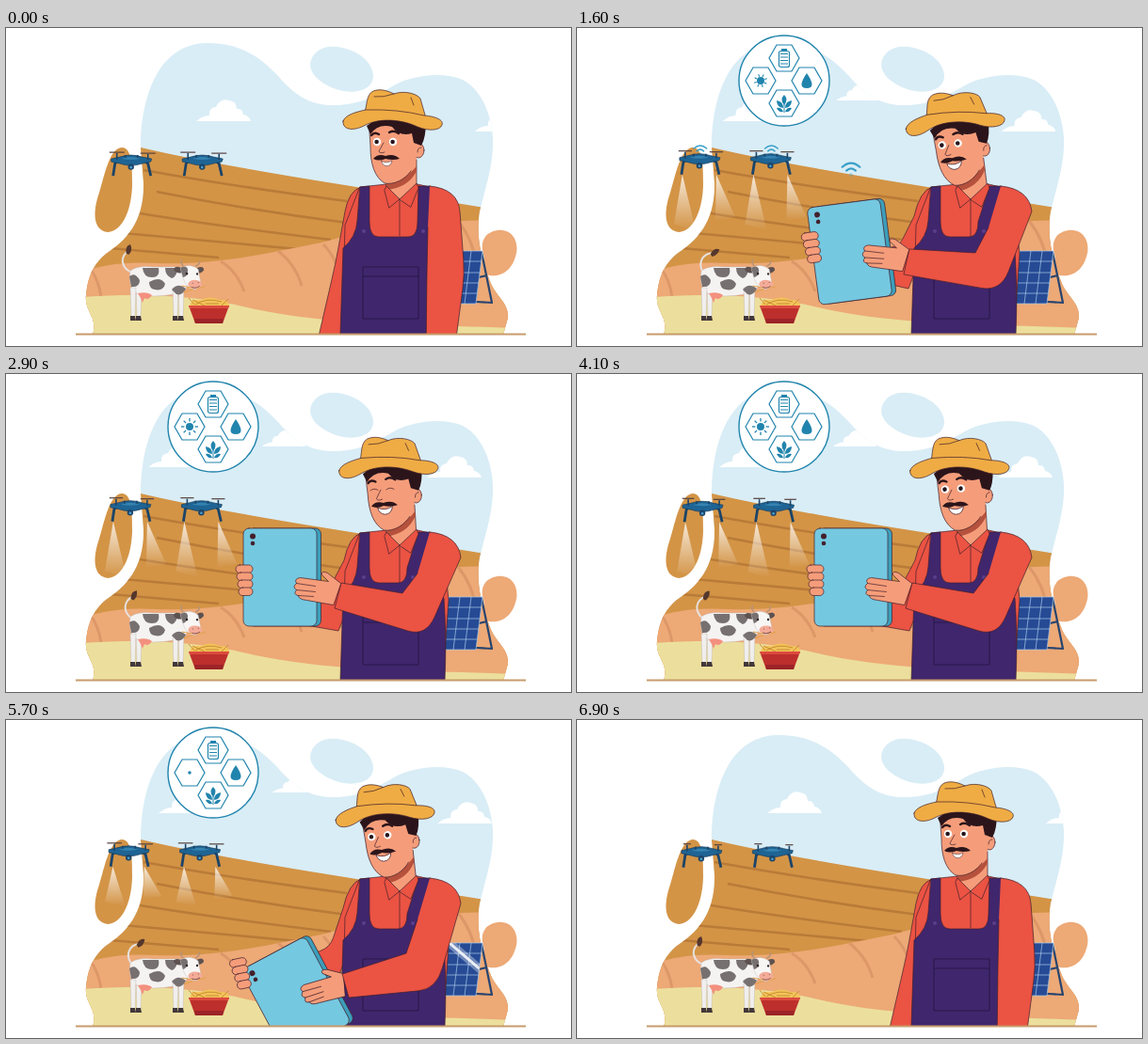
Animation, 600 px wide and 338 px high, one loop 7000 ms. Source, as an HTML page:

```html
<!DOCTYPE html>
<html lang="en">
<head>
<meta charset="utf-8">
<title>Smart farming</title>
<style>
html,body{margin:0;width:100%;height:100%;overflow:hidden;background:#fff}
svg{display:block;width:100vw;height:100vh}
.ink{stroke:#43202c;stroke-width:.7;stroke-linejoin:round;stroke-linecap:round}
.no{fill:none}
</style>
</head>
<body>
<svg id="stage" viewBox="0 0 600 338"></svg>
<script>
const LOOP = 7000, TURN = 6900;
const BLUE = '#2184ad', SKIN = '#f59d7a', SHIRT = '#eb5343', PURPLE = '#40266d', HAT = '#efac44';
const stage = document.getElementById('stage');

const cloud = id => `<path id="${id}" fill="#fff" d="M-29 0Q-22-6-15-6Q-16-14-8-15Q-3-25 6-22Q14-21 14-13Q20-14 21-7Q27-6 29 0Z"/>`;
const wifi = id => `<g id="${id}" fill="none" stroke="#3aa0c8" stroke-width="2" stroke-linecap="round">
  <circle r="1.8" fill="#3aa0c8" stroke="none"/><path d="M-4.5-4Q0-8 4.5-4"/><path d="M-8.5-7.5Q0-15 8.5-7.5"/></g>`;
const drone = id => `<g id="${id}">
  <g class="beam" fill="url(#ray)"><path d="M-18 13L-27 66L-4 72Z"/><path d="M18 13L17 62L38 58Z"/></g>
  <path d="M-14-3L-17 0L-19 13M14-3L18 0L21 13" class="no" stroke="#1c4468" stroke-width="2.8"/>
  <path d="M-21-5L-12-7Q0-11 12-7L22-5L21-2L12 0Q0 4-12 0L-21-2Z" fill="#1e6494" stroke="#173d5c" stroke-width=".7"/>
  <path d="M-10-5Q0-9 10-5Q0-3-10-5" fill="#3583b0"/>
  <path d="M-15-4V-11M18-4V-10M-6-6V-9M7-6V-9" stroke="#1c4468" stroke-width="1.6"/>
  <g class="prop" stroke="#54403f" stroke-width="1.2"><path d="M-8 0H8"/><path d="M-8 0H8"/></g>
  <circle cy="3.5" r="3.2" fill="#1c4468"/><circle cy="4" r="1.3" fill="#4ba1cd"/>
</g>`;
const hex = (x, y, id, icon) => `<g transform="translate(${x} ${y})">
  <path class="no" stroke="${BLUE}" stroke-width="1.2" d="M-16 0L-8-14H8L16 0L8 14H-8Z"/><g id="${id}" fill="${BLUE}">${icon}</g></g>`;
const spin = (n, draw) => Array.from({length: n}, (_, i) => `<g transform="rotate(${i * 360 / n})">${draw}</g>`).join('');

const battery = `<path d="M-3-10H3V-8H-3Z"/><rect class="no" x="-5.5" y="-7.5" width="11" height="17" rx="2" stroke="${BLUE}" stroke-width="1.2"/>
  <path d="M-4-4.5H4M-4-1H4M-4 2.5H4M-4 6H4" stroke="${BLUE}" stroke-width="1.1"/>`;
const drop = '<path d="M0-8Q11 8 0 8Q-11 8 0-8Z"/>';
const sun = '<circle id="core" r="4"/><g id="rays">' + spin(8, `<path d="M0-5.6V-9" stroke="${BLUE}" stroke-width="1.3"/>`) + '</g>';
const leaf = `<path d="M0-9Q5-4 0 2Q-5-4 0-9ZM1 5Q1-2 8-3Q8 4 1 5ZM-1 5Q-1-2-8-3Q-8 4-1 5ZM1 9Q3 4 8 5Q6 10 1 9ZM-1 9Q-3 4-8 5Q-6 10-1 9Z"/>
  <path d="M0 0V10" stroke="${BLUE}"/>`;

const BLOB = `M143 127C143 80 158 18 212 16C250 15 272 33 288 50C301 65 317 81 344 82
  C374 83 393 72 412 61C432 50 464 46 485 55C506 66 516 94 517 118C518 145 509 170 503 195
  C498 224 507 251 514 269C520 286 534 291 533 308L528 326H92C98 307 83 302 85 284
  C87 262 94 250 106 240C128 226 147 205 146 165Z`;

const scenery = `
<path d="${BLOB}" fill="#d9edf6"/>
<path d="M324 34C329 20 345 17 361 22C379 27 391 40 390 53C388 67 369 70 354 66C336 61 319 48 324 34Z" fill="#d9edf6"/>
<g clip-path="url(#land)">
  ${cloud('c1')}${cloud('c2')}${cloud('c3')}
  <path d="M70 119L143 127Q210 143 360 167L540 196V330H70Z" fill="#d39446"/>
  <path class="no" stroke="#b97b38" stroke-width="2.6" d="M146 151Q245 169 362 184M160 174Q260 194 362 207M142 197Q228 211 345 225M124 218L310 235M110 234L226 244"/>
  <path d="M80 260Q112 247 160 250C225 252 280 239 335 228Q420 203 540 204V330H80Z" fill="#eda976"/>
  <path class="no" stroke="#dd9768" stroke-width="3" d="M89 255Q99 269 101 286M289 237Q308 252 314 274M337 230Q352 245 356 270M228 248Q245 258 253 280M480 205Q496 225 499 250"/>
  <path d="M80 286C155 281 212 286 265 299C350 317 450 315 540 319V330H80Z" fill="#ecdf9d"/>
</g>
<path d="M123 127C134 127 134 148 134 165C134 190 125 216 108 217C92 215 92 195 99 175C105 155 110 128 123 127Z" fill="#d39446"/>
<path d="M522 215C538 213 546 228 541 243C537 258 525 265 513 263C503 260 510 250 507 240C503 228 508 217 522 215Z" fill="#eda976"/>`;

const panel = `
<path d="M505 238L516 292M502 265L511 263M499 291L517 292" class="no" stroke="#27446f" stroke-width="2.2"/>
<path d="M470 237H506L499 293H462Z" fill="#264a94"/>
<path class="no" stroke="#a9cbe8" stroke-width=".7" d="M470 237H506L499 293H462ZM482 237L475 293M494 237L487 293M469 248H505M467 260H503M465 271H502M464 282H500"/>
<g clip-path="url(#cells)"><g id="glint"><path d="M-35-30L35 30" stroke="#fff" stroke-width="9" opacity=".35"/>
<path d="M-35-30L35 30" stroke="#fff" stroke-width="3" opacity=".85"/></g></g>`;

const leg = (x, y) => `<path d="M${x} ${y}H${x + 6}L${x + 5} 307H${x + 1}Z" fill="#f1efee" stroke="#b9b2b0" stroke-width=".4"/><path d="M${x} 306H${x + 5}L${x + 6} 311H${x}Z" fill="#42383a"/>`;
const cow = `
<g id="tail"><path class="no" d="M134 260C122 256 120 244 129 237" stroke="#e6e1df" stroke-width="2"/><path d="M127 240Q125 232 131 230Q134 236 130 241Z" fill="#55372c"/></g>
${leg(138, 275)}${leg(183, 275)}
<path d="M132 258Q140 252 156 254L184 254Q194 258 194 270Q192 282 178 283Q155 287 141 283Q129 278 132 258Z" fill="#f5f3f2" stroke="#b9b2b0" stroke-width=".4"/>
${leg(132, 276)}${leg(177, 276)}
<path d="M140 282Q150 280 155 284Q151 290 147 287L145 292L143 287Z" fill="#f3907f"/>
<path d="M131 264Q137 259 142 268Q142 276 133 275ZM145 255H162Q164 265 155 265Q146 265 145 255ZM152 270Q164 263 169 272Q167 280 158 278Q152 277 152 270ZM169 255H182Q182 264 176 266Q169 263 169 255ZM176 278Q183 270 191 277Q187 285 181 283Z" fill="#777070"/>
<g id="cowHead">
  <path d="M186 255Q179 252 178 257Q181 262 188 260ZM202 255Q210 251 210 257Q207 261 203 260Z" fill="#5d5250"/>
  <path d="M188 253Q184 249 187 246M201 253Q206 251 205 247" class="no" stroke="#b99376" stroke-width="1.6"/>
  <path d="M185 255Q195 249 204 256L207 270Q205 279 197 277Q189 274 185 255Z" fill="#f8f6f5" stroke="#b9b2b0" stroke-width=".4"/>
  <path d="M185 255Q192 251 193 257Q193 264 188 265Z" fill="#777070"/>
  <ellipse cx="201" cy="272" rx="7.5" ry="4.6" fill="#f3ab98"/>
  <path d="M198 271H199M204 270H205M197 275Q202 277 206 274" class="no" stroke="#8d5751"/>
  <circle cx="192" cy="261" r="1.3" fill="#2f2527"/><circle cx="203" cy="261" r="1.2" fill="#2f2527"/>
  <path d="M198 276L187 274M199 277L189 281M204 276L212 274" stroke="#e3a14e"/>
</g>
<path d="M195 296Q196 287 207 289Q217 284 227 289Q238 288 237 297Z" fill="#f2c45a"/>
<path class="no" stroke="#c98e32" d="M198 289L211 295M201 294Q213 286 229 291M194 287L200 294M229 295L236 288M212 293H226"/>
<path d="M194 295H237L230 314H201Z" fill="#bd2f2c"/><path d="M194 295H237L236 298H195Z" fill="#dc4a3e"/><path d="M200 309H231L230 314H201Z" fill="#9c2428"/>`;

const eye = (x, y) => `<circle cx="${x}" cy="${y}" r="4.2" fill="#fff"/><circle cx="${x - .4}" cy="${y}" r="2.3" fill="#26151b"/>`;
const head = `
<g id="head">
  <path d="M404 150L436 130V170L419 184L404 172Z" fill="${SKIN}"/>
  <path class="ink no" d="M436 140V168M404 164V173"/>
  <path d="M404 165Q422 163 436 147V152Q427 170 404 172Z" fill="#b5513c"/>
  <ellipse class="ink" cx="438" cy="130" rx="6" ry="8" fill="${SKIN}"/><path class="ink no" d="M437 132Q437 127 441 127"/>
  <path d="M386 100L387 126C387 144 391 158 402 165C418 168 434 153 436 136V100Z" fill="${SKIN}"/>
  <path class="ink no" d="M386 110L387 126C387 144 391 158 402 165C412 167 424 161 430 152"/>
  <path d="M383 104Q395 94 412 96L446 98Q446 117 441 125L433 122L431 112Q418 116 410 105Q395 101 387 113Z" fill="#2b151b"/>
  <g id="open">${eye(394, 121)}${eye(411, 121)}</g>
  <path id="shut" class="ink no" d="M390 122Q394 119 398 122M407 122Q411 119 415 122"/>
  <path class="no" d="M388 114Q391 110 396 113M407 111Q412 108 417 112" stroke="#2b151b" stroke-width="2.4" stroke-linecap="round"/>
  <path class="ink no" d="M401 122Q397 129 396 131Q397 134 402 132"/>
  <g id="mouth"><path class="ink" d="M-7-2Q1 2 8-3Q7 5 0 5Q-6 4-7-2Z" fill="#fff"/></g>
  <path d="M390 139Q395 133 403 136Q412 133 418 139Q411 141 403 139Q396 142 390 139Z" fill="#2b151b"/>
  <path class="ink" d="M380 93C384 82 382 71 390 67C398 64 406 67 412 70C423 66 437 70 440 75L446 96Q415 88 380 93Z" fill="${HAT}"/>
  <path class="ink" d="M358 99C360 92 373 89 382 87Q416 86 444 93C457 94 465 98 463 103C461 109 449 110 437 105C420 97 396 95 380 104C368 110 357 108 358 99Z" fill="${HAT}"/>
  <path class="ink no" d="M391 73Q401 74 412 70M430 74L433 82"/>
</g>`;

const torso = `
<path class="ink" d="M376 169L404 166L419 182L437 166L463 172L470 240L464 326H357L360 210Z" fill="${SHIRT}"/>
<path id="bib" class="ink" fill="${PURPLE}"/>
<path class="no" d="M379 254H438V309H379ZM379 264H438" stroke="#23153f" stroke-width=".8"/>
<circle cx="380" cy="216" r="2" fill="#5a3f8b"/><circle id="button" cy="216" r="2" fill="#5a3f8b"/>`;
const collar = `<path class="ink" d="M402 172L404 168L418 182L407 191ZM418 182L436 165L438 170L430 190Z" fill="${SHIRT}"/><path class="ink no" d="M418 182V221"/>`;

const tablet = `<g id="tablet"><rect class="ink" x="-33" y="-52" width="77" height="104" rx="6" fill="#3c9fbc"/>
  <rect class="ink" x="-38.5" y="-52" width="78" height="104" rx="6" fill="#74c8e0"/>
  <circle cx="-28.5" cy="-43.5" r="3" fill="#43202c"/><circle cx="-28.5" cy="-36" r="2.3" fill="#43202c"/></g>`;
const finger = (y, i) => `<rect class="ink" x="${i - 10}" y="${y}" width="${18 - i}" height="8.5" rx="4.2" fill="${SKIN}"/>`;
const hands = {
  grip: `<g id="grip">${[-17, -9, -1, 7].map(finger).join('')}</g>`,
  reach: `<path id="reach" class="ink" d="M2-7C-10-6-20-6-32 2L-42 14Q-40 20-34 16L-36 19Q-30 24-20 20L6 12Z" fill="${SKIN}"/>`,
  right: `<path id="rightHand" class="ink" d="M3-13L-11-24Q-18-27-17-22L-10-15L-40-19Q-47-18-44-13Q-49-9-44-6Q-48-1-42 0Q-42 4-33 5L-5 10ZM-44-13L-24-10M-44-6L-24-4M-42 0L-26 1" fill="${SKIN}"/>`
};

stage.innerHTML = `
<defs>
  <clipPath id="land"><path d="${BLOB}"/></clipPath>
  <clipPath id="cells"><path d="M470 237H506L499 293H462Z"/></clipPath>
  <clipPath id="above"><path d="M0 0H600V325H0Z"/></clipPath>
  <linearGradient id="ray" x1="0" y1="0" x2="0" y2="1"><stop stop-color="#fff" stop-opacity=".8"/><stop offset="1" stop-color="#fff" stop-opacity="0"/></linearGradient>
</defs>
<rect width="600" height="338" fill="#fff"/>
${scenery}
<g id="badge"><circle r="48" fill="#fff" stroke="${BLUE}" stroke-width="1.4"/>
  ${hex(0, -24, 'battery', battery)}${hex(-25, 0, 'sun', sun)}${hex(24, 0, 'drop', drop)}${hex(0, 24, 'leaf', leaf)}</g>
${panel}${cow}
${wifi('w1')}${wifi('w2')}${wifi('w3')}
${drone('d1')}${drone('d2')}
<g clip-path="url(#above)">
  <path id="leftArm" class="ink" fill="${SHIRT}"/>
  ${torso}${head}${collar}${hands.reach}${tablet}${hands.grip}${hands.right}
  <path id="rightArm" class="ink" fill="${SHIRT}"/>
</g>
<path d="M74 325.5H552" stroke="#c79b6c" stroke-width="1.8"/>`;

const el = {};
stage.querySelectorAll('[id]').forEach(n => el[n.id] = n);
const put = (n, x, y, r = 0, sx = 1, sy = sx) =>
  n.setAttribute('transform', `translate(${x} ${y}) rotate(${r}) scale(${sx} ${sy})`);
const turn = (n, r, x, y) => n.setAttribute('transform', `rotate(${r} ${x} ${y})`);
const show = (n, v) => n.setAttribute('opacity', v);
const ramp = (v, a, b) => Math.min(1, Math.max(0, (v - a) / (b - a)));
const out = k => 1 - (1 - k) ** 3;

// Poses: hanging, reaching down, lifting, tilted, holding
const TIMES = [150, 800, 1200, 1600, 2100];
const POSE = {
  // shoulder, elbow, two wrist corners, inner elbow
  left: [
    [360, 195, 350, 250, 328, 345, 357, 345, 362, 262],
    [358, 200, 345, 254, 289, 295, 302, 318, 360, 274],
    [358, 200, 344, 242, 290, 260, 295, 282, 354, 270],
    [358, 200, 342, 232, 290, 240, 290, 263, 352, 277],
    [359, 198, 339, 236, 290, 240, 290, 262, 353, 273]],
  right: [
    [482, 195, 487, 262, 476, 345, 446, 345, 447, 262],
    [482, 195, 462, 278, 405, 335, 383, 312, 433, 259],
    [483, 195, 457, 286, 364, 295, 357, 270, 425, 248],
    [483, 195, 450, 280, 347, 262, 353, 235, 423, 239],
    [483, 195, 446, 279, 349, 249, 356, 222, 421, 233]],
  tablet: [[345, 440, -70], [359, 371, -60], [307, 294, -28], [289, 238, -7.5], [290.5, 216, 0]],
  grip: [[340, 360, -30], [275, 318, -30], [250, 270, -12], [250, 234, -8], [254, 220, 0]],
  hand: [[-80], [-50], [-24], [-2], [0]],
  head: [[0], [-3.4], [-6.3], [-7], [-3.4]]
};

function slope(keys, i, j) {
  if (!i || i === TIMES.length - 1) return 0;
  return (keys[i + 1][j] - keys[i - 1][j]) / (TIMES[i + 1] - TIMES[i - 1]);
}
function pose(name, u) {
  const keys = POSE[name], last = TIMES.length - 1;
  if (u <= TIMES[0]) return keys[0];
  if (u >= TIMES[last]) return keys[last];
  let i = 0;
  while (u > TIMES[i + 1]) i++;
  const d = TIMES[i + 1] - TIMES[i], k = (u - TIMES[i]) / d, e = k * k * (3 - 2 * k);
  return keys[i].map((a, j) => a + (keys[i + 1][j] - a) * e
    + d * k * (1 - k) * ((1 - k) * slope(keys, i, j) - k * slope(keys, i + 1, j)));
}

function sleeve(n, p, top, pit) {
  const [ox, oy, ex, ey, ax, ay, bx, by, ix, iy] = p;
  const near = (x, y, k) => `${ex + (x - ex) * k} ${ey + (y - ey) * k}`;
  n.setAttribute('d', `M${top} ${ox} ${oy}L${near(ox, oy, .25)}Q${ex} ${ey} ${near(ax, ay, .2)}L${ax} ${ay}L${bx} ${by}L${ix} ${iy}L${pit}`);
}

function drawMan(u, t) {
  const L = pose('left', u), R = pose('right', u), [gx, gy, gr] = pose('grip', u);
  const s = 11 * ramp(u, 150, 1200);
  el.bib.setAttribute('d', `M376 169L386 168V206Q386 222 396 222H${427 - s}Q${437 - s} 222 ${437 - s} 206
    L438 168L451 168L${450 - s} 216L465 238Q468 280 466 326H355L358 234Q372 222 373 205Z`);
  el.button.setAttribute('cx', 443 - s);
  sleeve(el.leftArm, L, '377 169Q364 173', '376 215');
  sleeve(el.rightArm, R, '450 168Q480 171', `${448 - s} 212`);
  put(el.tablet, ...pose('tablet', u));
  put(el.reach, (L[4] + L[6]) / 2, (L[5] + L[7]) / 2);
  put(el.grip, gx, gy, gr);
  put(el.rightHand, (R[4] + R[6]) / 2, (R[5] + R[7]) / 2, pose('hand', u)[0]);
  show(el.reach, u < 950 ? 1 : 0);
  show(el.grip, u < 950 ? 0 : 1);
  turn(el.head, pose('head', u)[0], 420, 174);
  put(el.mouth, 404, 143, 0, .75 + .3 * ramp(u, 200, 900));
  const blink = t > 2850 && t < 3000;
  show(el.open, blink ? 0 : 1);
  show(el.shut, blink ? 1 : 0);
}

function drawWifi(n, x, y, p) {
  put(n, x, y, 0, n === el.w3 ? 1.1 : .8);
  [[.22, .45], [.27, .65], [.33, .75]].forEach(([a, b], i) =>
    show(n.children[i], ramp(p, a, a + .05) * (1 - ramp(p, b - .05, b + .05))));
}

function drawDrone(n, x, y, t, u) {
  put(n, x, y);
  const [beam, prop] = [n.querySelector('.beam'), n.querySelector('.prop')];
  const s = ramp(u, 600, 1450);
  beam.setAttribute('transform', `translate(0 ${13 * (1 - s)}) scale(${.75 + .25 * s} ${s})`);
  const w = .75 + .25 * Math.cos(t * Math.PI / 130);
  put(prop.children[0], -15, -12, 0, w, 1);
  put(prop.children[1], 18, -11, 0, w, 1);
}

function draw(t) {
  const u = t < TURN / 2 ? t : Math.max(0, TURN - t);
  const drift = 51 * Math.sin(ramp(u, 0, 2100) * Math.PI / 2);
  put(el.c1, 231 - drift, 99);
  put(el.c2, 346 - drift, 77, 0, .8, .75);
  put(el.c3, 527 - drift, 110);

  put(el.badge, 220, 56, 0, out(ramp(u, 50, 550)));
  put(el.battery, 0, 0, 0, out(ramp(u, 600, 1200)));
  put(el.leaf, 0, 0, 0, out(ramp(u, 600, 1200)));
  put(el.drop, 0, 0, 0, out(ramp(u, 620, 1200)));
  const s = out(ramp(u, 1250, 2100));
  put(el.core, 0, 0, 0, ramp(u, 1000, 1450));
  put(el.rays, 0, 0, 90 * (s - 1), s);

  const g = ramp(u, 700, 1500);
  put(el.glint, 460 + 48 * g, 287 - 54 * g);
  show(el.glint, g > 0 && g < 1 ? 1 : 0);

  turn(el.tail, 22 - 20 * Math.cos(u * Math.PI / 1800), 134, 260);
  turn(el.cowHead, 1.5 * Math.cos(u * Math.PI / 800), 188, 262);

  const a = t * Math.PI / 500 + .87, dx = 1.6 * Math.sin(a), y = 143.5 + .8 * Math.sin(a);
  drawDrone(el.d1, 131.5 + dx, y, t, u);
  drawDrone(el.d2, 207 + dx, y, t, u);
  const p = u < 500 ? 0 : (u - 500) % 750 / 750;
  drawWifi(el.w1, 132.5 + dx, 134, p);
  drawWifi(el.w2, 208 + dx, 134, p);
  drawWifi(el.w3, 291, 156, p);
  drawMan(u, t);
}

function tick() {
  draw(performance.now() % LOOP);
  requestAnimationFrame(tick);
}
tick();
</script>
</body>
</html>
```
